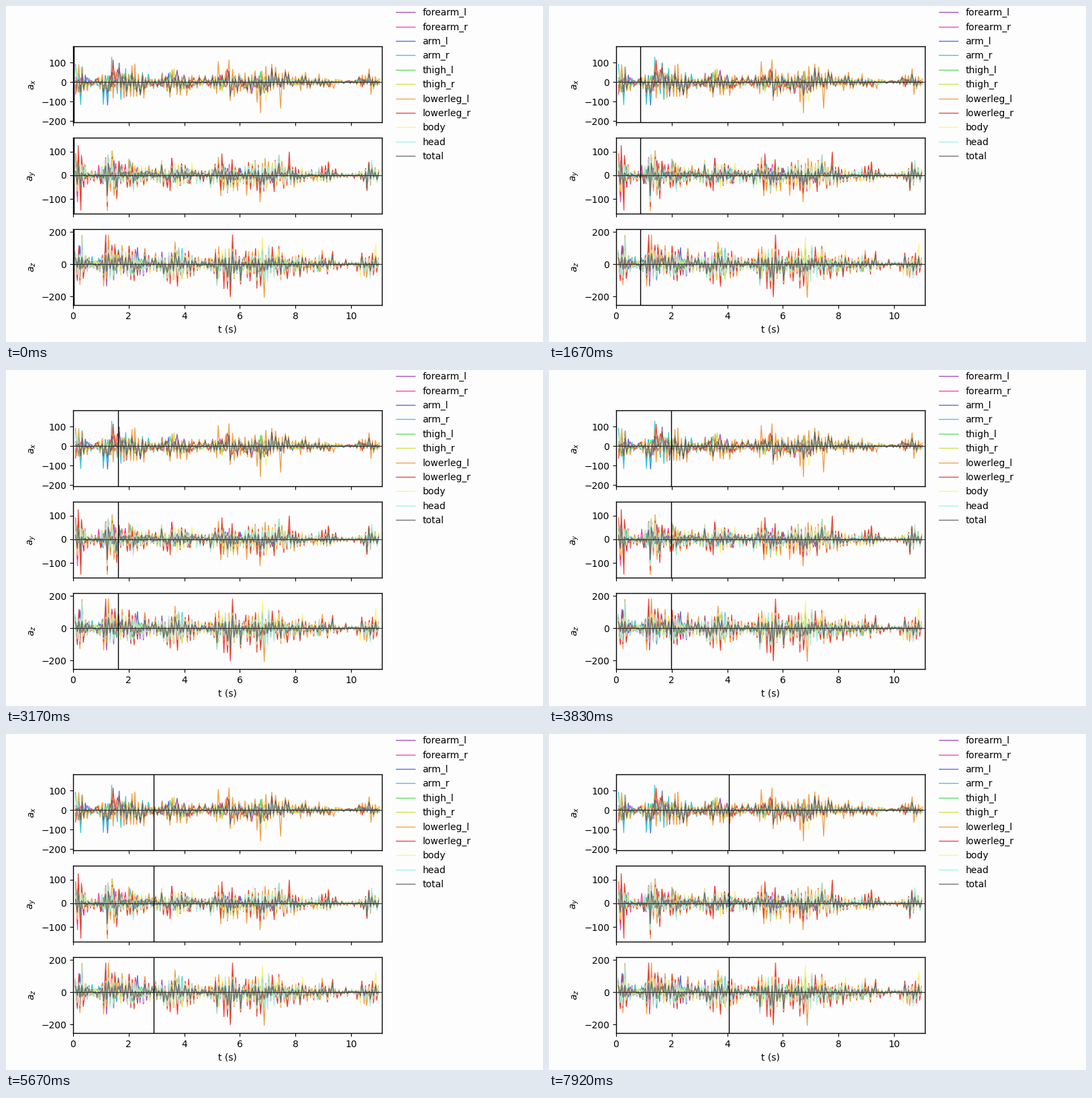
Recreate the animation shown at these times as a matplotlib script. Size 800 by 500 pixels, loop 8000 ms.

```python
import numpy as np
import matplotlib.pyplot as plt
from matplotlib.animation import FuncAnimation
from matplotlib.lines import Line2D

FRAMES, INTERVAL = 160, 50
PAPER = "#fefdfe"

COLORS = {
    "forearm_l": "#9a3fb5", "forearm_r": "#f531b0", "arm_l": "#3f63e0",
    "arm_r": "#28c6d6", "thigh_l": "#4fdc58", "thigh_r": "#c9e23c",
    "lowerleg_l": "#ee9a3c", "lowerleg_r": "#e8392f", "body": "#fcf47a",
    "head": "#a4ece2", "total": "#606468",
}
# Axis name: y limits, tick step, height of a full-strength impact
AXES = {"x": (-207, 183, 100, 130), "y": (-163, 160, 100, 120), "z": (-252, 219, 200, 185)}
# Phases of hard movement: centre, spread, strength
BURSTS = [(.2, .2, 1), (1.35, .28, 1), (2.2, .3, .6), (3.7, .6, .65), (5.5, .35, .8),
          (6.7, .45, .55), (7.6, .8, .45), (9.1, .3, .25), (10.65, .3, .45)]

rng = np.random.default_rng(8)
knots = np.arange(.08, 11.06, .06)
swing = (-1.0) ** np.arange(knots.size)
effort = .06 + sum(s * np.exp(-((knots - c) / w) ** 2 / 2) for c, w, s in BURSTS)


def impacts():
    """Alternating kicks, mostly light with a few heavy ones."""
    return swing * rng.gamma(2, .2, knots.size)


def share(part):
    """How strongly a body part moves; the arms calm down over time."""
    if "lowerleg" in part:
        return 1
    if "arm" in part:
        return 1.1 * np.exp(-knots / 8)
    return .75


def signal(part, common):
    if part == "total":
        return effort * .6 * common
    return effort * share(part) * (.6 * common + .7 * impacts() * rng.choice([-1, 1]))


fig, axes = plt.subplots(3, 1, sharex=True, figsize=(8, 5), dpi=100, facecolor=PAPER)
fig.subplots_adjust(left=.125, right=.7, top=.88, bottom=.11, hspace=.2)

cursors = []
for ax, (name, (low, high, tick, scale)) in zip(axes, AXES.items()):
    ax.set_facecolor(PAPER)
    ax.spines[:].set_linewidth(1)
    common = impacts()
    times = knots + rng.uniform(-.02, .02, knots.size)
    for part, color in COLORS.items():
        y = np.clip(scale * signal(part, common), .92 * low, .9 * high)
        ax.plot(times, y, color=color, lw=1, alpha=.9)
    ax.axhline(0, color="#303030", lw=.8, zorder=3)
    cursors.append(ax.axvline(0, color="black", lw=1, zorder=4))
    ax.set_ylim(low, high)
    ax.set_yticks([v for v in range(-200, 201, tick) if low < v < high])
    ax.set_ylabel(f"$a_{name}$")
axes[-1].set_xlim(0, 11.11)
axes[-1].set_xticks(range(0, 11, 2))
axes[-1].set_xlabel("t (s)")

# Legend column, running off the top edge
for i, (part, color) in enumerate(COLORS.items()):
    y = 9.3 + 21.37 * i
    fig.add_artist(Line2D((581 / 800, 609 / 800), (1 - y / 500,) * 2,
                          color=color, lw=1, alpha=.9))
    fig.text(620.5 / 800, 1 - (y + 4.9) / 500, part, fontsize=10, va="baseline")


def update(i):
    # The cursor advances in steps, twelve a second
    step = int((i * INTERVAL + 45) * 12 / 1000)
    now = .015 + .0425 * step
    for line in cursors:
        line.set_xdata([now, now])
    return cursors


anim = FuncAnimation(fig, update, frames=FRAMES, interval=INTERVAL,
                     init_func=lambda: update(0), repeat=True, repeat_delay=0)
plt.show()
```
